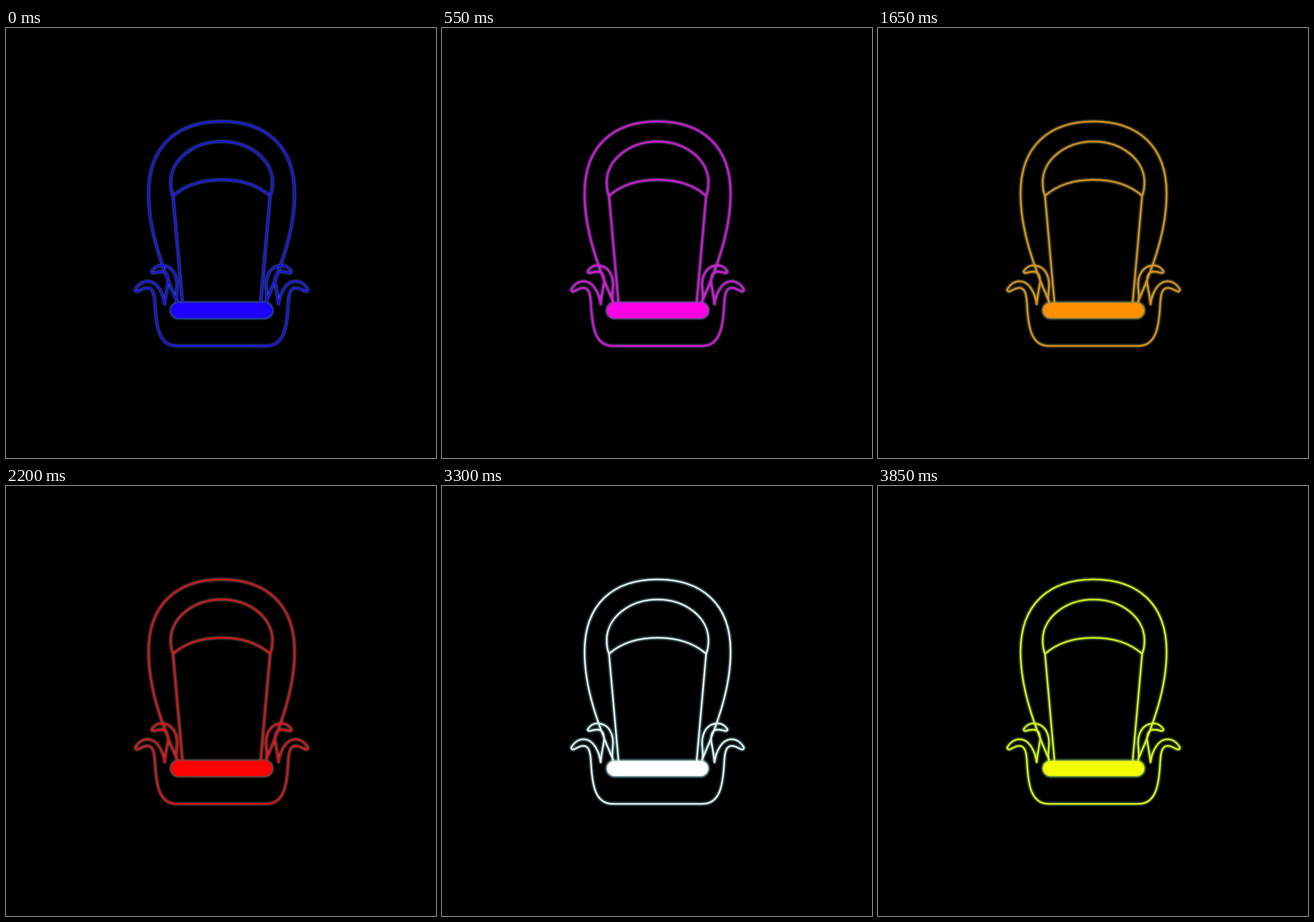
Recreate the animation shown at these times as an HTML page with a canvas. Size 748 by 748 pixels, loop 4400 ms.

```html
<!DOCTYPE html>
<html lang="en">
<head>
<meta charset="utf-8">
<title>Neon chair</title>
<style>
  html, body { margin: 0; width: 100%; height: 100%; overflow: hidden; background: #000; }
  canvas { display: block; }
</style>
</head>
<body>
<canvas id="stage" width="748" height="748"></canvas>
<script>
const ctx = document.getElementById('stage').getContext('2d');
const STEP = 550;
const CENTER = 375;
const GLOW_BASE = [55, 135, 140];

const COLORS = [
  [30, 0, 255],
  [255, 0, 230],
  [106, 255, 0],
  [255, 144, 0],
  [255, 0, 0],
  [0, 255, 255],
  [255, 255, 255],
  [242, 255, 0]
];

const leftHalf = new Path2D([
  // outer arch
  'M298 477 C271 415 248 352 248 288 C248 205 298 162.5 375 162.5',
  // backrest and its headrest
  'M307 478 L290.5 292 C287 284 286.5 277 286.5 268 C286.5 229 326 197.5 375 197.5',
  'M290.5 292 C312 273 342 264 375 264',
  // upper leaf
  'M297 478 C296 469 296 464 297 456 C300 431 290 413 270 413',
  'C263 413 257 418 254 422 C252 425 255 427 258 426',
  'C264 424 271 423 276 425 C281 428 282 434 282 441 C280 455 277 468 276 482',
  // lower leaf and base
  'C274 463 264 440.5 246 440.5 C236 440.5 229 448 225 454',
  'C224 458 227 459 230 458 C236 455 240 452 246 452',
  'C256 452 258 464 259 478 C261 520 266 553 297 553 H375'
].join(' '));

const outline = new Path2D(leftHalf);
outline.addPath(leftHalf, new DOMMatrix([-1, 0, 0, 1, 2 * CENTER, 0]));

const bar = new Path2D();
bar.roundRect(287, 478, 176, 26.5, 13.25);

const rgb = c => `rgb(${c.join(',')})`;
const mix = (a, b, t) => a.map((v, i) => Math.round(v + (b[i] - v) * t));

function strokeGlow(color, width, blur) {
  ctx.filter = `blur(${blur}px)`;
  ctx.strokeStyle = rgb(color);
  ctx.lineWidth = width;
  ctx.stroke(outline);
  ctx.stroke(bar);
  ctx.filter = 'none';
}

function draw(color) {
  ctx.fillStyle = '#000';
  ctx.fillRect(0, 0, 748, 748);
  strokeGlow(mix(GLOW_BASE, color, 0.35), 4.6, 1.7);
  ctx.strokeStyle = ctx.fillStyle = rgb(color);
  ctx.lineWidth = 2.1;
  ctx.stroke(outline);
  ctx.fill(bar);
}

const start = performance.now();
let shown = -1;

function tick() {
  const index = Math.floor((performance.now() - start) / STEP) % COLORS.length;
  if (index !== shown) draw(COLORS[shown = index]);
  requestAnimationFrame(tick);
}
tick();
</script>
</body>
</html>
```
